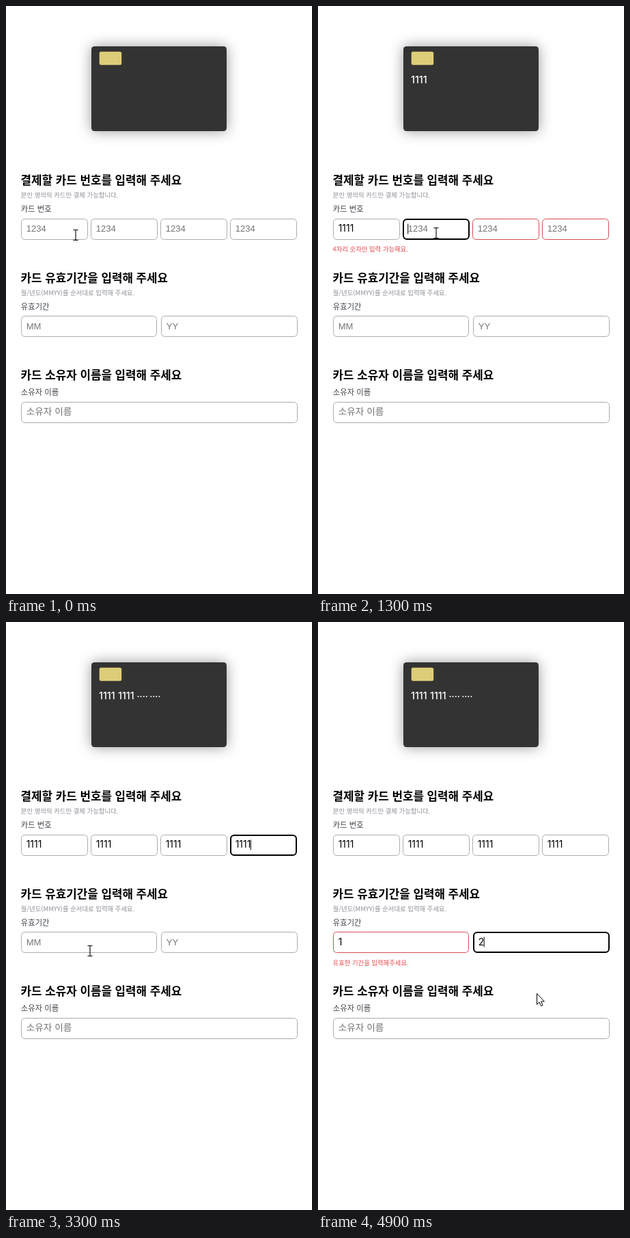
An HTML page that plays this animation: 448 by 860 pixels, repeating every 5000 ms.

```html
<!DOCTYPE html>
<html lang="ko">
<head>
<meta charset="utf-8">
<title>카드 등록</title>
<style>
  html, body { margin: 0; width: 100%; height: 100%; overflow: hidden; background: #fff; }
  svg { display: block; width: 100vw; height: 100vh; }
  text { font-family: "Noto Sans CJK KR", "Noto Sans CJK", "Noto Sans", sans-serif; white-space: pre; }
  .title { font-size: 16.85px; font-weight: 700; fill: #000; }
  .hint { font-size: 9.4px; fill: #8b8f96; }
  .label { font-size: 11.35px; fill: #3c4048; }
  .error { font-size: 9.35px; fill: #e5484d; }
  .entry { font-family: "Liberation Sans", Arial, sans-serif; font-size: 13.1px; fill: #757575; }
  .name { font-size: 13.7px; }
  .filled { font-family: Inter, sans-serif; font-size: 13.9px; fill: #000; }
  .digits { font-family: Inter, sans-serif; font-size: 14.25px; font-weight: 500; fill: #fff; }
  .dots { font-size: 12.2px; font-weight: 700; }
  .plate { fill: #333; filter: drop-shadow(0 0 10px rgba(0, 0, 0, .4)); }
</style>
</head>
<body>
<svg id="stage" viewBox="0 0 448 860">
  <rect class="plate" x="125" y="59" width="198" height="124" rx="4.5"/>
  <rect x="136.7" y="66.7" width="32.5" height="19.6" rx="2.5" fill="#ddcd78"/>
</svg>
<script>
const LOOP = 5000, STEP = 100;
const stage = document.getElementById('stage');

function add(tag, attrs, text = '') {
  const el = document.createElementNS('http://www.w3.org/2000/svg', tag);
  for (const key in attrs) el.setAttribute(key, attrs[key]);
  el.textContent = text;
  stage.append(el);
  return el;
}
const write = (cls, x, y, text) => add('text', { class: cls, x, y }, text);

write('title', 21.5, 260.5, '결제할 카드 번호를 입력해 주세요');
write('hint', 21.8, 280, '본인 명의의 카드만 결제 가능합니다.');
write('label', 21.8, 301, '카드 번호');
write('title', 21.5, 403.5, '카드 유효기간을 입력해 주세요');
write('hint', 21.8, 423, '월/년도(MMYY)를 순서대로 입력해 주세요.');
write('label', 21.8, 444, '유효기간');
write('title', 21.5, 545.7, '카드 소유자 이름을 입력해 주세요');
write('label', 21.8, 569.2, '소유자 이름');

const numberError = write('error', 21.6, 359, '');
const dateError = write('error', 21.6, 502, '');
const groups = [136, 164, 191.5, 210.2].map((x, i) =>
  write(i < 2 ? 'digits' : 'digits dots', x, 113, ''));

function makeField(x, y, w, base, hint, cls = 'entry') {
  return {
    x, y, w, hint, cls,
    box: add('rect', { fill: 'none' }),
    text: write(cls, x + 7.7, base, hint)
  };
}
const fields = [
  ...[22, 124, 226, 328].map(x => makeField(x, 311, 98, 330.2, '1234')),
  makeField(22, 453, 199, 473, 'MM'),
  makeField(227, 453, 200, 473, 'YY'),
  makeField(22, 579, 405, 597.8, '소유자 이름', 'entry name')
];

const caret = add('rect', { width: 1, height: 15, fill: '#000' });
const beam = add('path', {
  d: 'M-3.5-7.5H3.5M-3.5 7.5H3.5M0-7.5V7.5', fill: 'none', stroke: '#000', 'stroke-width': 1.1
});
const arrow = add('path', {
  d: 'M.5.5V16.3L4.1 12.9 6.6 18.7 9 17.6 6.6 12H11.4Z', fill: '#fff', stroke: '#000'
});

// time, field, characters held after the event
const events = [
  [300, 0, ''], ...typing(800, 0, '1111'),
  [1200, 1, ''], ...typing(1400, 1, '1111'),
  [1900, 2, ''], ...typing(2100, 2, '1111'),
  [2500, 3, ''], ...typing(2700, 3, '1111'),
  [3500, 4, ''], ...typing(4000, 4, '1'),
  [4400, 5, ''], ...typing(4600, 5, '2')
];
function typing(start, field, word) {
  return [...word].map((c, i) => [start + i * STEP, field, word.slice(0, i + 1)]);
}

// time, x, y of the pointer
const path = [
  [0, 102, 335], [400, 102, 335], [800, 147, 336.5], [1300, 173, 332],
  [1500, 186, 332], [1800, 283, 333], [1900, 286, 333], [2200, 366, 332],
  [2500, 370, 332], [2600, 366, 336], [3000, 156, 469], [3100, 128, 484],
  [3200, 128, 484], [3300, 123, 481], [3900, 123, 479], [4300, 257, 472],
  [4500, 257, 472], [4900, 320, 543]
];
function pointerAt(t) {
  const i = path.findIndex(p => p[0] > t);
  if (i < 0) return path[path.length - 1].slice(1);
  const [a, b] = [path[i - 1], path[i]];
  const k = (t - a[0]) / (b[0] - a[0]);
  return [a[1] + (b[1] - a[1]) * k, a[2] + (b[2] - a[2]) * k];
}

function frameBox(field, focused, wrong) {
  const line = focused ? 2 : 1;
  const shape = {
    x: field.x + line / 2, y: field.y + line / 2,
    width: field.w - line, height: 31 - line,
    rx: 5, 'stroke-width': line,
    stroke: focused ? '#000' : wrong ? '#d44d53' : '#acacac'
  };
  for (const key in shape) field.box.setAttribute(key, shape[key]);
}

function render(t) {
  const values = fields.map(() => '');
  let focus = -1, since = 0;
  for (const [at, field, value] of events) {
    if (at > t) break;
    values[field] = value;
    focus = field;
    since = at;
  }

  const full = values.map(v => v.length === 4);
  const badNumber = values[0] !== '' && !full.slice(0, 4).every(Boolean);
  const badDate = values[4] !== '', dated = values[5] !== '';
  numberError.textContent = badNumber ? '4자리 숫자만 입력 가능해요.' : '';
  dateError.textContent = dated ? '유효한 기간을 입력해주세요.' : badDate ? '숫자만 입력해주세요.' : '';

  fields.forEach((f, i) => {
    const wrong = i < 4 ? badNumber && !full[i] : i === 4 ? dated : i === 5 && badDate;
    frameBox(f, i === focus, wrong);
    f.text.textContent = values[i] || f.hint;
    f.text.setAttribute('class', values[i] ? 'filled' : f.cls);
  });
  groups.forEach((g, i) => {
    g.textContent = !full[i] ? '' : i < 2 ? values[i] : '····';
  });

  const lit = focus >= 0 && (t - since) % 1000 < 500;
  caret.style.display = lit ? '' : 'none';
  if (lit) {
    const f = fields[focus];
    const width = values[focus] ? f.text.getComputedTextLength() : 0;
    caret.setAttribute('x', f.x + 7.7 + width - .5);
    caret.setAttribute('y', f.y + 7.5);
  }

  const [x, y] = pointerAt(t);
  const overField = y < 486;
  beam.style.display = overField ? '' : 'none';
  arrow.style.display = overField ? 'none' : '';
  (overField ? beam : arrow).setAttribute('transform', `translate(${x} ${y})`);
}

const start = performance.now();
function tick(now) {
  const t = Math.max(0, now - start) % LOOP;
  render(Math.floor(t / STEP) * STEP);
  requestAnimationFrame(tick);
}
render(0);
requestAnimationFrame(tick);
</script>
</body>
</html>
```
